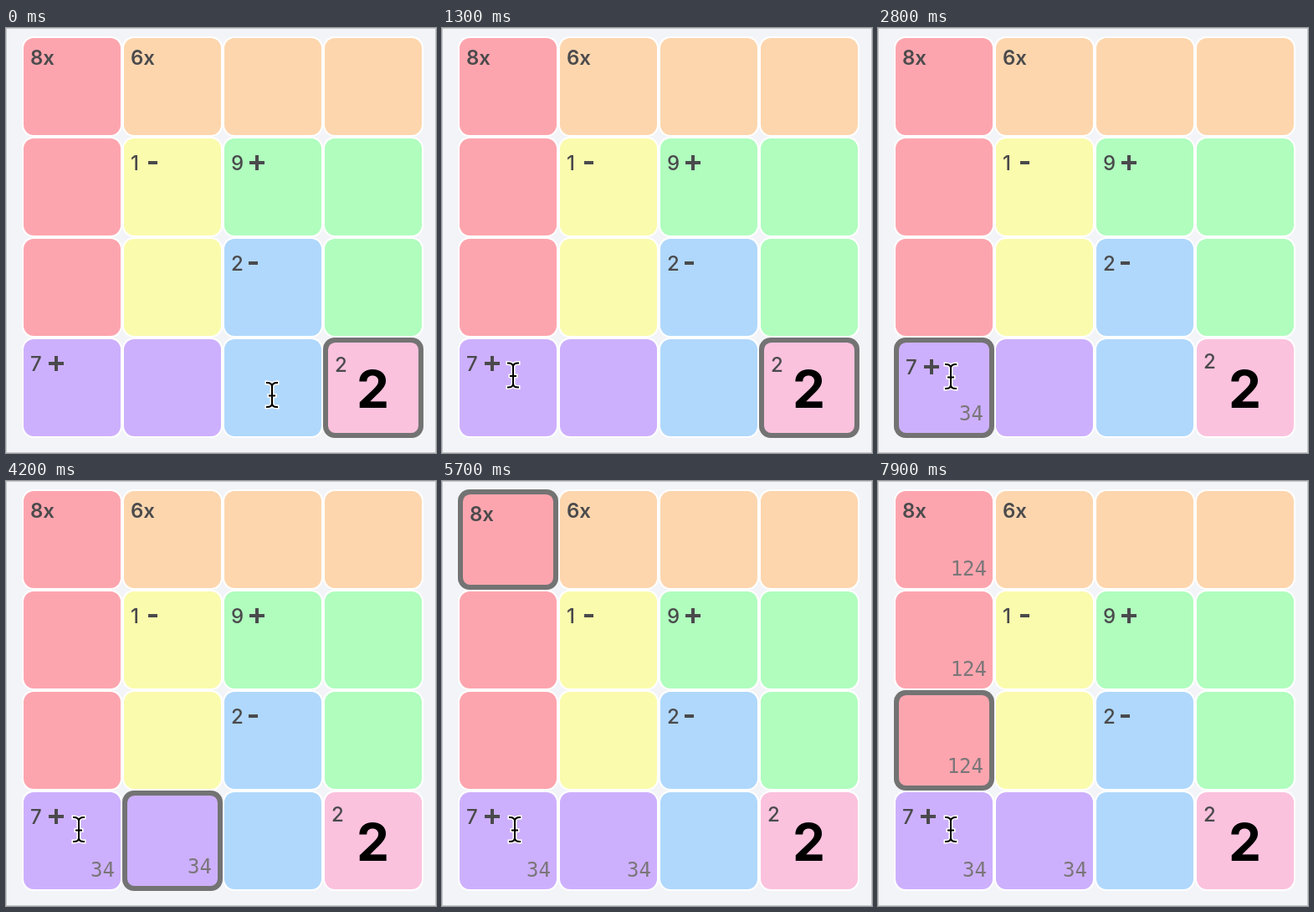
An HTML page with a canvas for the animation above (8000 ms loop, 514 by 508 pixels).

```html
<!DOCTYPE html>
<html lang="en">
<head>
<meta charset="utf-8">
<style>
html, body { margin: 0; width: 100%; height: 100%; overflow: hidden; background: #f3f4f8; }
canvas { display: block; }
</style>
</head>
<body>
<canvas id="stage" width="514" height="508"></canvas>
<script>
const ctx = document.getElementById('stage').getContext('2d');
const LOOP = 8000, STEP = 100;
const X0 = 19, Y0 = 10, SIZE = 120;
const INK = '#4a4a4c', NOTE = '#7a7679', RING = '#737373';

const COLORS = { r: '#fda5ae', o: '#fdd6ae', y: '#fbfbae', g: '#b0fdbe', b: '#b0d8fc', p: '#cdb0fd', k: '#fbc2de' };
const CAGES = ['rooo', 'rygg', 'rybg', 'ppbk'];
const LABELS = { '0,0': '8x', '1,0': '6x', '1,1': '1-', '2,1': '9+', '2,2': '2-', '0,3': '7+', '3,3': '2' };

// Selected cell from a given time on
const MOVES = [
  [0, '3,3'], [1500, '0,3'], [3000, '1,3'], [4400, '0,3'], [4700, '0,2'],
  [4900, '0,1'], [5100, '0,0'], [6900, '0,1'], [7600, '0,2']
];
// Pencil marks: the times at which each digit is typed
const NOTES = {
  '0,3': ['34', 2100, 2400],
  '1,3': ['34', 3400, 3700],
  '0,0': ['124', 5900, 6200, 6500],
  '0,1': ['124', 7200, 7300, 7400],
  '0,2': ['124', 7700, 7800, 7900]
};
// Pointer stops: time, x, y
const PATH = [[0, 318, 438.5], [300, 318, 438.5], [1100, 85, 415], [1300, 85, 415], [1500, 87, 416.5], [LOOP, 87, 416.5]];

function box(x, y, w, r, fill) {
  ctx.fillStyle = fill;
  ctx.beginPath();
  ctx.roundRect(x, y, w, w, r);
  ctx.fill();
}

function text(str, x, y, font, fill, align = 'left') {
  ctx.font = font;
  ctx.fillStyle = fill;
  ctx.textAlign = align;
  ctx.fillText(str, x, y);
}

function drawLabel(label, x, y) {
  const op = label.slice(1);
  if (op === 'x') return text(label, x, y + 33.5, '600 24px Inter, sans-serif', INK);
  if (!op) return text(label, x, y + 36.5, '500 24px Inter, sans-serif', INK);
  text(label[0], x, y + 40, '500 24px Inter, sans-serif', INK);
  ctx.fillStyle = INK;
  if (op === '+') {
    ctx.fillRect(x + 22, y + 29, 18, 4);
    ctx.fillRect(x + 29, y + 22, 4, 18);
  } else {
    ctx.fillRect(x + 21, y + 29, 11, 4);
  }
}

function drawCell(col, row, t, selected) {
  const key = col + ',' + row;
  const x = X0 + col * SIZE, y = Y0 + row * SIZE;
  const edge = selected ? 6 : 2, shift = edge - 2;
  box(x, y, SIZE, 14, selected ? RING : '#fff');
  box(x + edge, y + edge, SIZE - 2 * edge, 14 - edge * 0.9, COLORS[CAGES[row][col]]);
  if (LABELS[key]) drawLabel(LABELS[key], x + 10 + shift, y + shift);
  if (key === '3,3') text('2', x + 59.5, y + 84, '700 62px Inter, sans-serif', '#000', 'center');
  if (NOTES[key]) {
    const [digits, ...times] = NOTES[key];
    const typed = digits.slice(0, times.filter(at => t >= at).length);
    text(typed, x + 111 - shift, y + 103 - shift, '24px "DejaVu Sans Mono", monospace', NOTE, 'right');
  }
}

function pointerAt(t) {
  const i = PATH.findIndex((p, n) => n && t < p[0]);
  const a = PATH[i - 1], b = PATH[i];
  const k = (t - a[0]) / (b[0] - a[0]);
  const e = k * k * (3 - 2 * k);
  return [a[1] + (b[1] - a[1]) * e, a[2] + (b[2] - a[2]) * e];
}

function drawPointer(x, y) {
  const beam = new Path2D('M-6 -14.5Q0 -14.5 0 -10Q0 -14.5 6 -14.5M0 -10V10M-6 14.5Q0 14.5 0 10Q0 14.5 6 14.5M-3 1H3');
  ctx.save();
  ctx.translate(x, y);
  ctx.lineCap = 'square';
  ctx.lineJoin = 'round';
  for (const [width, color] of [[5, '#fff'], [2, '#000']]) {
    ctx.lineWidth = width;
    ctx.strokeStyle = color;
    ctx.stroke(beam);
  }
  ctx.restore();
}

function draw(t) {
  ctx.fillStyle = '#f3f4f8';
  ctx.fillRect(0, 0, 514, 508);
  ctx.lineWidth = 1;
  ctx.strokeStyle = '#c6c7c9';
  ctx.strokeRect(0.5, 0.5, 513, 507);
  const active = MOVES.filter(m => m[0] <= t).pop()[1];
  for (let row = 0; row < 4; row++) {
    for (let col = 0; col < 4; col++) drawCell(col, row, t, active === col + ',' + row);
  }
  drawPointer(...pointerAt(t));
}

function frame() {
  const t = performance.now() % LOOP;
  draw(Math.floor(t / STEP) * STEP);
  requestAnimationFrame(frame);
}
frame();
</script>
</body>
</html>
```
